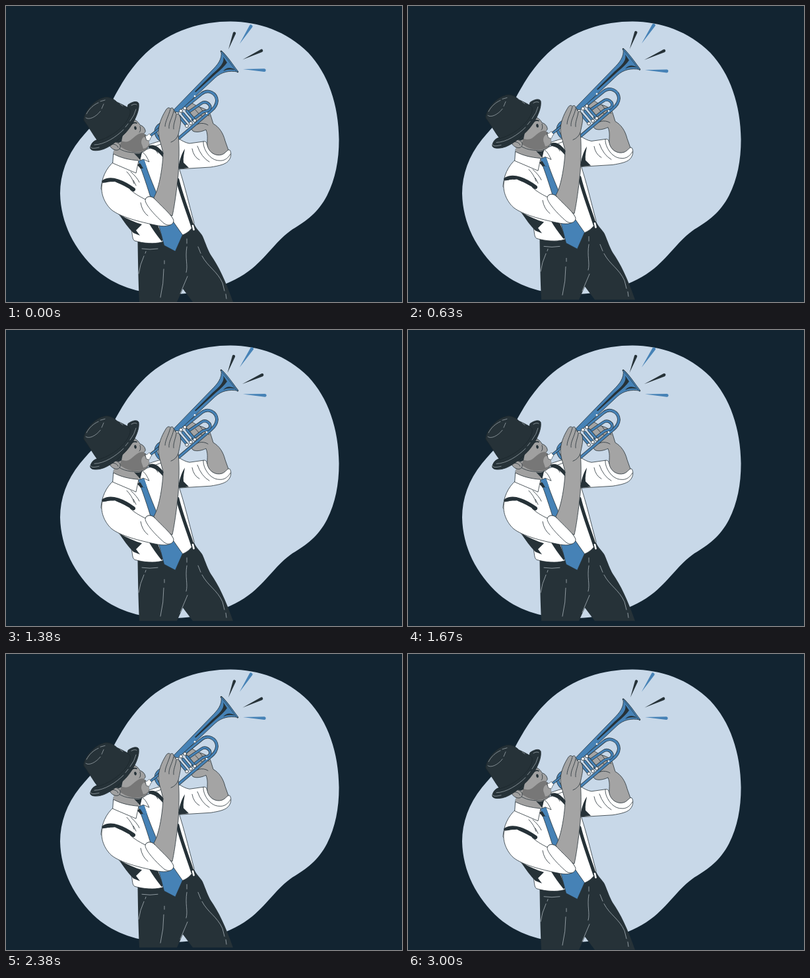
These frames come from a looping animation (600 by 450 pixels, 3.04 s). An HTML page with a canvas:

```html
<!DOCTYPE html>
<html lang="en">
<head>
<meta charset="utf-8">
<title>Trumpet player</title>
<style>
html, body { margin: 0; width: 100%; height: 100%; overflow: hidden; background: #122431; }
canvas { display: block; width: 600px; height: 450px; }
</style>
</head>
<body>
<canvas id="stage" width="600" height="450"></canvas>
<script>
const ctx = document.getElementById('stage').getContext('2d');
const LOOP = 3040, RISE = 8.6, PULSE = 1087;
const BG = '#122431', SKY = '#c8d8e8', INK = '#263238', BLUE = '#4682b6';
const SKIN = '#a4a4a4', FACE = '#a0a0a0', BEARD = '#777777', WHITE = '#ffffff', SEAM = '#a9b3b9';

const cache = {};
const path = d => cache[d] || (cache[d] = new Path2D(d));

function shape(d, fill, stroke = INK, width = 0.8) {
  ctx.fillStyle = fill;
  ctx.fill(path(d));
  if (stroke) line(d, stroke, width);
}

function line(d, color = INK, width = 0.8) {
  ctx.strokeStyle = color;
  ctx.lineWidth = width;
  ctx.stroke(path(d));
}

function tube(d, width) {
  line(d, INK, width + 1.4);
  line(d, BLUE, width);
}

function dot(x, y, r, fill, stroke) {
  ctx.beginPath();
  ctx.arc(x, y, r, 0, 7);
  ctx.fillStyle = fill;
  ctx.fill();
  if (stroke) {
    ctx.strokeStyle = stroke;
    ctx.lineWidth = 0.8;
    ctx.stroke();
  }
}

function backdrop() {
  ctx.fillStyle = BG;
  ctx.fillRect(0, 0, 600, 450);
  shape('M340 23.5C298 23.5 250 36 211.5 72C186 97 174 120 161.5 143C149 164 130 181 112 203C92 228 82 256 82 285C83 330 103 370 138 402C165 425 200 437 240 438C290 440 340 426 373 399C399 377 410 356 434 339.5C455 327 473 314 486.5 288C499 263 504.5 235 504.5 203C504 150 488 103 458 71C425 38 383 24 340 23.5Z', SKY, null);
}

// Tapered stroke: sharp at the base, round at the tip
function ray(x0, y0, x1, y1, r, color) {
  const a = Math.atan2(y1 - y0, x1 - x0);
  ctx.beginPath();
  ctx.moveTo(x0, y0);
  ctx.arc(x1, y1, r, a - Math.PI / 2, a + Math.PI / 2);
  ctx.closePath();
  ctx.fillStyle = color;
  ctx.fill();
}

function rays(k) {
  ray(337 - 2 * k, 66 - k, 346 - 1.3 * k, 41.5 - 2 * k, 2.2, INK);
  ray(354, 57.5 - k, 371 + 2 * k, 31 - 3 * k, 2.5, BLUE);
  ray(358.5 - k, 81.5 + k, 387 + 1.4 * k, 68 + 0.4 * k, 2.3, INK);
  ray(359, 96 + 2 * k, 391.3 + 1.3 * k, 97.6 + 2.4 * k, 2.4, BLUE);
}

function trousers() {
  shape('M199.5 357C215 363 240 360 262 346L285 331C288 339 295 344 298 350C303 362 306 371 310 378C322 395 333 418 344 450H283L268 430L259 450H202C200.5 420 200 390 199.5 357Z', INK, null);
  [
    'M206 369Q218 371 230 369', 'M212 373L211 376', 'M209 380Q203 393 201 407',
    'M240 387V392', 'M239 400Q239 422 234 443', 'M274 354L274 361',
    'M274 366C271 384 276 394 273 405', 'M275 411L264 437',
    'M291 366L295 376', 'M297 380C306 397 320 403 328 421L331 433', 'M333 438L334 445'
  ].forEach(d => line(d, SEAM));
}

function backArm() {
  shape('M276 146C284 147 288 153 294 154C302 156 308 160 310 166L314 179C323 184 329 193 332 205L338 222C330 233 313 229 305 216C304 205 307 198 303 188C297 191 288 193 283 190L279 184C282 180 288 182 292 179C286 173 278 170 273 160Z', SKIN);
  line('M294 154Q299 163 308 167M292 179Q300 177 306 181M287 158Q292 165 299 169');
  shape('M216 211C232 205 248 201 262 202C267 205 272 208 278 209L299 206C304 205 304 209 305 212C307 222 317 229 327 226C333 224 336 217 339 219C342 223 341 230 338 234C334 241 322 243 310 245L261 248L230 262Z', WHITE);
  line('M299 206C298 217 309 235 323 235C331 236 337 231 340 225M290 213Q296 230 308 237M282 217Q284 229 293 234');
  shape('M271 217C265 226 262 238 261 248L277 246L269 238C268 231 270 224 271 217Z', INK, null);
}

function torso() {
  shape('M163 222L164 236C151 247 145 262 144 278L172 318L190 341C192 348 191 355 195 357C208 361 225 362 236 359L268 348C277 344 283 338 285 330C277 300 270 270 262 246L240 208L205 221Z', WHITE);
  line('M183 252Q191 260 194 270M189 252Q199 261 202 268M193 265L197 273M230 215Q238 222 242 231M223 212L230 224');
  // Braces
  shape('M217 212C224 210 229 213 235 219L243 229L240 233C233 223 226 218 217 216Z', INK, null);
  line('M260 264C265 286 276 314 283 336', INK, 5);
  line('M283 333L284.5 340', INK, 4.2);
  line('M283 334L284.5 340', WHITE, 2.7);
  shape('M172 317C184 324 196 329 206 332L197 341L203 349L193 345Q181 333 172 317Z', INK, null);
  shape('M217 331L230 333L238 354L236 358Q224 343 217 331Z', INK, null);
  line('M148.5 267C160 260 178 268 193 279', INK, 6);
}

function tie() {
  shape('M201 236L209 234L213 246L204 247Z', BLUE);
  shape('M204 246L213 246C221 269 228 283 234 300L267.5 348L256.5 373L239.5 364C232 333 216 278 204 246Z', BLUE);
  shape('M198 241L204 247L211 247L205 239Z', INK, null);
  shape('M201 235L209 233L214 247L208 247Z', BLUE, null);
}

function head() {
  shape('M163 204C164 215 163 224 163 227C174 233 187 237 201 235L206 222L188 200Z', FACE, null);
  shape('M160 207C166 190 178 180 192 172C198 174 201 177 203 181C207 182 210 185 211 189C212 192 209 193 208 195C212 195 214 198 213 201C217 206 218 211 215 215C211 222 203 224 195 223C180 223 168 217 160 207Z', FACE);
  shape('M175 205C181 208 187 206 191 202C197 197 201 193 207 193C212 194 216 203 217 209C216 218 207 222 198 222C188 223 179 218 172 213Z', BEARD, null);
  shape('M209 199C205 202 204 207 206 211L208 217C213 216 217 213 217 208C216 204 214 201 209 199Z', FACE, null);
  shape('M161 205C170 189 181 182 193 172C187 179 184 185 178 191C177 196 176 201 175 206L171 208Z', INK, null);
  shape('M156 207C162 205 171 207 173 212C174 218 169 221 163 218C159 216 156 212 156 207Z', FACE);
  line('M161 210Q168 210 170 215M203 183Q205 190 202 192');
  ctx.save();
  ctx.translate(196, 185.5);
  ctx.rotate(-0.25);
  ctx.scale(1, 1.6);
  dot(0, 0, 1.8, INK);
  ctx.restore();
  line('M189 181Q193 176 198 178', INK, 1.7);
  shape('M194 224C199 225 203 225 207 222L204 235Q200 230 194 224Z', INK, null);
  // Collar
  shape('M163 225C174 231 187 234 201 235L197 254L162 239Z', WHITE);
  shape('M206 222C211 224 214 231 217 237L208 233L203 235Z', WHITE);
}

function hat() {
  shape('M128 214C130 206 136 203 143 203C160 199 177 183 185 150C192 145 199 144 201 148C203 161 192 181 181 193C171 203 157 216 143 219C133 221 126 219 128 214Z', INK, '#1c272d');
  shape('M118 174C116 164 133 143 146 140C155 136 163 141 168 146C176 150 184 153 188 158C191 172 168 197 139 205C132 196 125 183 118 174Z', INK, '#1c272d');
  [
    'M122 164C126 156 133 150 140 147', 'M143 145L150 143',
    'M121 170C126 174 137 168 143 160', 'M145 156L148 149', 'M173 149L177 152',
    'M134 211C149 211 167 199 178 188', 'M181 184L185 179', 'M188 175Q195 166 197 157',
    'M128 214C129 218 136 216 141 215', 'M190 151Q195 148 198 150'
  ].forEach(d => line(d, SEAM, 0.7));
}

function trumpet() {
  // Slides and bows
  tube('M258 163L231 182C225 188 226 196 232 202C238 206 247 202 254 197', 3.2);
  tube('M270 155L297 133C306 126 319 132 319.5 144C319 151 316 155 311 159L262 201', 3.4);
  tube('M277 161L296 148C303 143 311 150 309 156C307 161 301 159 297 162L283 173', 3);
  // Bell and main tube
  shape('M326 69C328 81 320 90 312 98L254 158L259.5 163L317 109C327 100 338 98 351 100C343 90 336 78 326 69Z', BLUE);
  shape('M329 77C332 87 322 95 312 104L286 130L287.5 131L318 103C325 97 331 92 335 86Z', INK, null);
  shape('M347 97C339 92 334 94 329 99C335 96 340 96 347 97Z', INK, null);
  line('M326 69C336 78 343 90 351 100', INK, 2.6);
  line('M326.5 70C336 78 343 90 350.5 99.5', BLUE, 1.5);
  // Valves
  for (let i = 0; i < 3; i++) {
    const x = 259 + 6 * i, y = 163.5 - 4 * i;
    tube(`M${x + 3} ${y + 4}L${x + 14} ${y + 17}`, 3);
    dot(x, y, 2.4, WHITE, INK);
    dot(x + 15, y + 18.7, 2.4, WHITE, INK);
  }
  dot(286, 137, 1.3, WHITE);
  dot(304, 163, 1.3, WHITE);
  // Lead pipe and mouthpiece
  tube('M219 197L233 186', 2.6);
  shape('M211 197C214 198 215 196 217 194L221 199C218 200 219 203 217 205L213 204Z', WHITE, INK, 0.6);
}

function frontArm() {
  const sleeve = 'M146 269C142 283 149 300 160 310C174 321 202 328 226 333C239 336 249 335 252 330C256 325 249 317 240 308L225 293C220 288 213 289 211 294';
  shape(sleeve + 'C202 290 192 285 187 278L165 267Z', WHITE, null);
  line(sleeve + 'C203 290 194 285 188 279');
  line('M204 299Q206 312 215 319');
  shape('M238 224C236 212 231 202 231 190C232 176 238 165 243 157Q246 153 249 156Q253 153 254 158Q255 161 258 164Q262 163 264 169C266 176 263 186 261 196C263 212 262 240 261 256C258 285 255 305 252 319C240 316 226 302 224 291C231 280 237 250 238 224Z', SKIN);
  line('M249 157C246 168 241 176 241 183M254 160C252 170 246 178 247 186M258 165C257 173 253 180 254 187M261 196Q258 204 250 207');
  shape('M225 293C220 288 212 289 211 295C211 302 226 319 240 331C246 335 253 333 254 327C254 320 236 305 225 293Z', WHITE);
}

function player(y) {
  ctx.save();
  ctx.translate(0, y);
  trousers();
  backArm();
  torso();
  tie();
  head();
  hat();
  trumpet();
  frontArm();
  ctx.restore();
}

function draw(now) {
  const t = now % LOOP;
  const lift = 1 - Math.abs(1 - 2 * t / LOOP);
  const p = t % PULSE / 870;
  const k = t < 2 * PULSE && p < 1 ? Math.sin(Math.PI * p) ** 2 : 0;
  backdrop();
  rays(k);
  player(-RISE * lift);
}

ctx.lineCap = ctx.lineJoin = 'round';
const start = performance.now();
function tick() {
  draw(performance.now() - start);
  requestAnimationFrame(tick);
}
tick();
</script>
</body>
</html>
```
